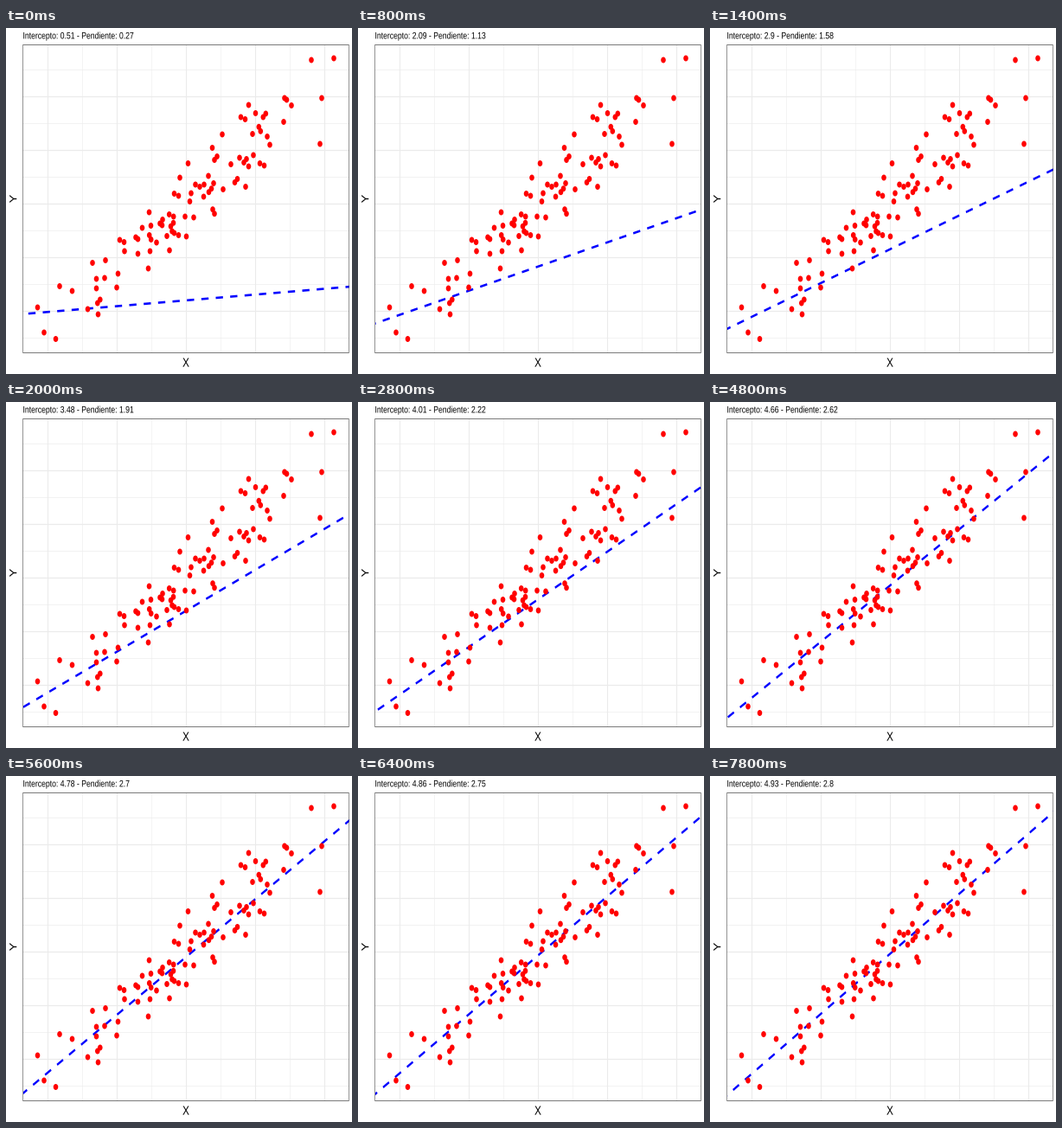
A matplotlib script for the animation above (8 s loop, 400 by 400 pixels).

```python
import numpy as np
import matplotlib.pyplot as plt
from matplotlib.animation import FuncAnimation
from matplotlib.collections import EllipseCollection, PolyCollection
from matplotlib.patches import PathPatch, Rectangle
from matplotlib.textpath import TextPath
from matplotlib.transforms import Affine2D

SIZE = 400
WIDE = 1.25                 # the plot is laid out 500 x 400 and shown square
LEFT, RIGHT, TOP, BOTTOM = 19.5, 396.5, 19.5, 375.5
X0, Y5 = 208.5, 203.5       # pixel of x = 0 and of y = 5
X_UNIT, Y_UNIT = 80, 24.8
DASH = 20.88                # length of one dash with its gap
HALF_W = 1.3

FRAMES, STEP_MS = 40, 200

# Dots that have a close neighbour, grouped by the offset to it.
PAIRED = [
    ((5, 2.5), [(271.5, 103), (219, 181), (194.5, 191.5), (131.5, 245),
                (293.5, 156.5), (188.7, 215.5)]),
    ((2.5, 2), [(150, 242), (178, 226), (192, 235), (322, 81)]),
    ((3, -4), [(190.5, 229.3), (234.5, 189.7), (264.5, 178.5), (241, 152.5),
               (105.8, 318), (297.3, 103), (275, 155.5)]),
    ((2, 5), [(239, 209.7), (165.7, 239.5), (292.3, 114.3)]),
]
SINGLE = [
    (36.5, 323), (44, 352), (57.5, 359.5), (62, 298.5), (76.5, 304),
    (94.5, 325), (106.5, 331), (104.5, 301), (104.5, 290), (100, 271.5),
    (115, 268.5), (114, 289), (128, 300), (129.5, 284), (137, 258),
    (152.5, 261), (157.5, 231), (165.5, 213), (167.5, 228.5), (166.5, 258),
    (164.5, 278), (174, 248), (181, 221.5), (186, 240.5), (189, 257),
    (199.5, 239.5), (208.5, 241), (207, 218), (217, 219), (212.5, 200.5),
    (214, 191), (201, 173), (210.5, 156.5), (229, 181), (228.5, 195),
    (240, 179.5), (234, 171), (251, 186.5), (238.5, 138.5), (250, 123),
    (260, 157.5), (270, 150), (277, 183.5), (280.5, 160), (286, 147),
    (305, 135), (302, 125.5), (285, 122.5), (288.5, 98.5), (280.5, 89),
    (321, 108.5), (330, 89.5), (353, 37), (379, 35), (365, 81), (363, 134),
]

fig = plt.figure(figsize=(4, 4), dpi=100, facecolor="white")
ax = fig.add_axes([0, 0, 1, 1])
ax.set_xlim(0, SIZE * WIDE)
ax.set_ylim(SIZE, 0)
ax.axis("off")


def bar(x, y, w, h, color, z):
    """Rectangle centred on pixel (x, y)."""
    ax.add_patch(Rectangle((x * WIDE - w / 2, y - h / 2), w, h, fc=color,
                           lw=0, snap=False, zorder=z))


def h_line(y, width, color, z):
    bar((LEFT + RIGHT) / 2, y, (RIGHT - LEFT) * WIDE, width, color, z)


def v_line(x, width, color, z):
    bar(x, (TOP + BOTTOM) / 2, width, BOTTOM - TOP, color, z)


def glyphs(text, size):
    return TextPath((0, 0), text, size=size, prop={"family": "Liberation Sans"})


def add_text(path):
    patch = PathPatch(path, fc="black", lw=0, zorder=6)
    ax.add_patch(patch)
    return patch


def draw_grid():
    for i in range(-5, 6):
        width = 0.65 if i % 2 else 1.3
        h_line(Y5 + i * 31, width, "#ebebeb", 1)
        if abs(i) < 5:
            v_line(X0 + i * X_UNIT / 2, width, "#ebebeb", 1)
    for y in (TOP, BOTTOM):
        h_line(y, 0.65, "#333333", 5)
    for x in (LEFT, RIGHT):
        v_line(x, 0.65, "#333333", 5)


def draw_dots():
    dots = list(SINGLE)
    for (dx, dy), group in PAIRED:
        for x, y in group:
            dots += [(x, y), (x + dx, y + dy)]
    spots = np.array(dots) * (WIDE, 1)
    size = np.full(len(spots), 6.95)
    ax.add_collection(EllipseCollection(
        size, size, np.zeros(len(spots)), units="xy", offsets=spots,
        offset_transform=ax.transData, fc="red", lw=0, zorder=4),
        autolim=False)


def draw_axis_titles():
    for text, angle, x, y in (("X", 0, 208, 386.6), ("Y", 90, 8.2, 197.5)):
        path = glyphs(text, 14.7).transformed(
            Affine2D().rotate_deg(angle).scale(1, -1))
        box = path.get_extents()
        shift = Affine2D().translate(x * WIDE - (box.x0 + box.x1) / 2,
                                     y - (box.y0 + box.y1) / 2)
        add_text(path.transformed(shift))


def fit(k):
    """Intercept and slope after k steps of descent."""
    return (4.9938 - 4.484 * np.exp(-0.1087 * k),
            2.85 - 2.58 * np.exp(-0.1008 * k))


def dashes(intercept, slope):
    """Quads of a dashed line that starts one panel width left of the panel."""
    span = RIGHT - LEFT
    rise = -slope * Y_UNIT / X_UNIT
    x = LEFT - span
    y = Y5 + (5 - intercept) * Y_UNIT + rise * (x - X0)
    start = np.array([x * WIDE, y])
    step = np.array([WIDE, rise])
    length = 3 * span * np.hypot(*step)
    along = step / np.hypot(*step)
    side = np.array([-along[1], along[0]]) * HALF_W
    quads = []
    for d in np.arange(0, length, DASH):
        a = start + along * d
        b = a + along * DASH / 2
        quads.append([a - side, b - side, b + side, a + side])
    return quads


draw_grid()
draw_dots()
draw_axis_titles()
title = add_text(glyphs("-", 10.8))
line = PolyCollection([], fc="blue", lw=0, zorder=3)
ax.add_collection(line, autolim=False)
panel = Rectangle((LEFT * WIDE, TOP), (RIGHT - LEFT) * WIDE, BOTTOM - TOP,
                  transform=ax.transData)
line.set_clip_path(panel)


def update(k):
    intercept, slope = fit(k)
    text = f"Intercepto: {round(intercept, 2):g} - Pendiente: {round(slope, 2):g}"
    place = Affine2D().scale(1, -1).translate(LEFT * WIDE, 12.4)
    title.set_path(glyphs(text, 10.8).transformed(place))
    line.set_verts(dashes(intercept, slope))
    return title, line


anim = FuncAnimation(fig, update, frames=FRAMES, interval=STEP_MS,
                     init_func=lambda: update(0), repeat=True)
plt.show()
```
